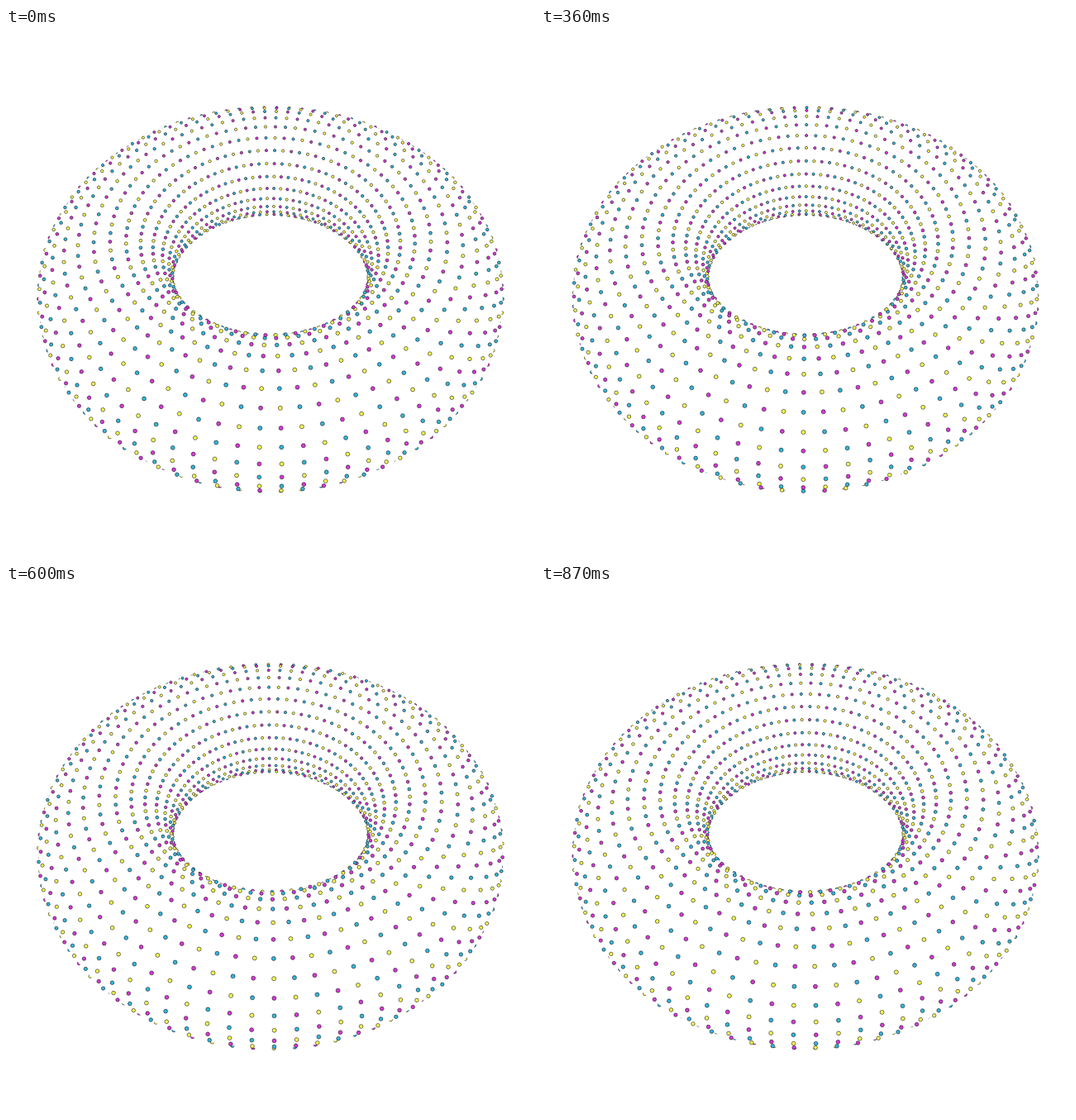
Animation, 640 px wide and 640 px high, one loop 900 ms. Source, as an HTML page with a canvas:

```html
<!DOCTYPE html>
<html lang="en">
<head>
<meta charset="utf-8">
<title>Dotted torus</title>
<style>
  html, body { margin: 0; width: 100%; height: 100%; overflow: hidden; background: #fff; }
  canvas { display: block; }
</style>
</head>
<body>
<canvas id="stage" width="640" height="640"></canvas>
<script>
const ctx = document.getElementById('stage').getContext('2d');
const TAU = Math.PI * 2;
const LOOP = 900, STEP = 30;
const COLS = 84, RINGS = 28;
const FOCAL = 640, MIDDLE = 320;

// Torus with tube radius 1; y points down, z away from the camera.
const RADIUS = 2.594, CENTER_Y = -0.474, CENTER_Z = 8.615;
const TILT = 51.91 * Math.PI / 180;
const SIN = Math.sin(TILT), COS = Math.cos(TILT);
const DOT = 0.0235, RING_PHASE = 0.14;
const COLORS = ['#ffff50', '#2fb8e2', '#dc36dc'];

function rotate(side, front, up) {
  return { x: side, y: front * SIN - up * COS, z: -front * COS - up * SIN };
}

function surface(theta, alpha) {
  const normal = rotate(Math.cos(alpha) * Math.sin(theta), Math.cos(alpha) * Math.cos(theta), Math.sin(alpha));
  const core = rotate(RADIUS * Math.sin(theta), RADIUS * Math.cos(theta), 0);
  const x = core.x + normal.x;
  const y = core.y + normal.y + CENTER_Y;
  const z = core.z + normal.z + CENTER_Z;
  const scale = FOCAL / z;
  const facing = -(normal.x * x + normal.y * y + normal.z * z) / Math.hypot(x, y, z);
  return { x: MIDDLE + x * scale, y: MIDDLE + y * scale, scale, facing };
}

// Tube angle where the line of sight just touches the torus.
function rimAngle(theta, side) {
  const radial = rotate(Math.sin(theta), Math.cos(theta), 0);
  const axis = rotate(0, 0, 1);
  const dot = v => -(v.x * radial.x * RADIUS + v.y * (radial.y * RADIUS + CENTER_Y)
    + v.z * (radial.z * RADIUS + CENTER_Z));
  const a = dot(radial), b = dot(axis);
  return Math.atan2(b, a) + side * Math.acos(1 / Math.hypot(a, b));
}

function makeBody() {
  const path = new Path2D();
  for (const side of [-1, 1]) {
    for (let i = 0; i < 240; i++) {
      const theta = i / 240 * TAU;
      const p = surface(theta, rimAngle(theta, side));
      if (i) path.lineTo(p.x, p.y); else path.moveTo(p.x, p.y);
    }
    path.closePath();
  }
  return path;
}

const body = makeBody();

function drawDot(p) {
  ctx.beginPath();
  ctx.arc(p.x, p.y, DOT * p.scale, 0, TAU);
  ctx.fillStyle = p.color;
  ctx.fill();
  ctx.stroke();
}

function draw(t) {
  const dots = [];
  // The color seam sits underneath, where it is never seen.
  for (let i = 0; i < COLS; i++) {
    for (let j = 0; j < RINGS; j++) {
      const ring = j - 7;
      const p = surface((i - 0.5 + t) / COLS * TAU, (ring + RING_PHASE + 2 * t) / RINGS * TAU);
      p.color = COLORS[(i + ring + 9) % 3];
      dots.push(p);
    }
  }
  ctx.fillStyle = '#fff';
  ctx.fillRect(0, 0, 640, 640);
  ctx.strokeStyle = '#141414';
  ctx.lineWidth = 0.6;
  dots.filter(p => p.facing <= 0 && p.facing > -0.22).forEach(drawDot);
  ctx.fillStyle = '#fff';
  ctx.fill(body, 'evenodd');
  dots.filter(p => p.facing > 0).forEach(drawDot);
}

function tick() {
  const time = performance.now() % LOOP;
  draw(Math.floor(time / STEP) * STEP / LOOP);
  requestAnimationFrame(tick);
}
tick();
</script>
</body>
</html>
```
